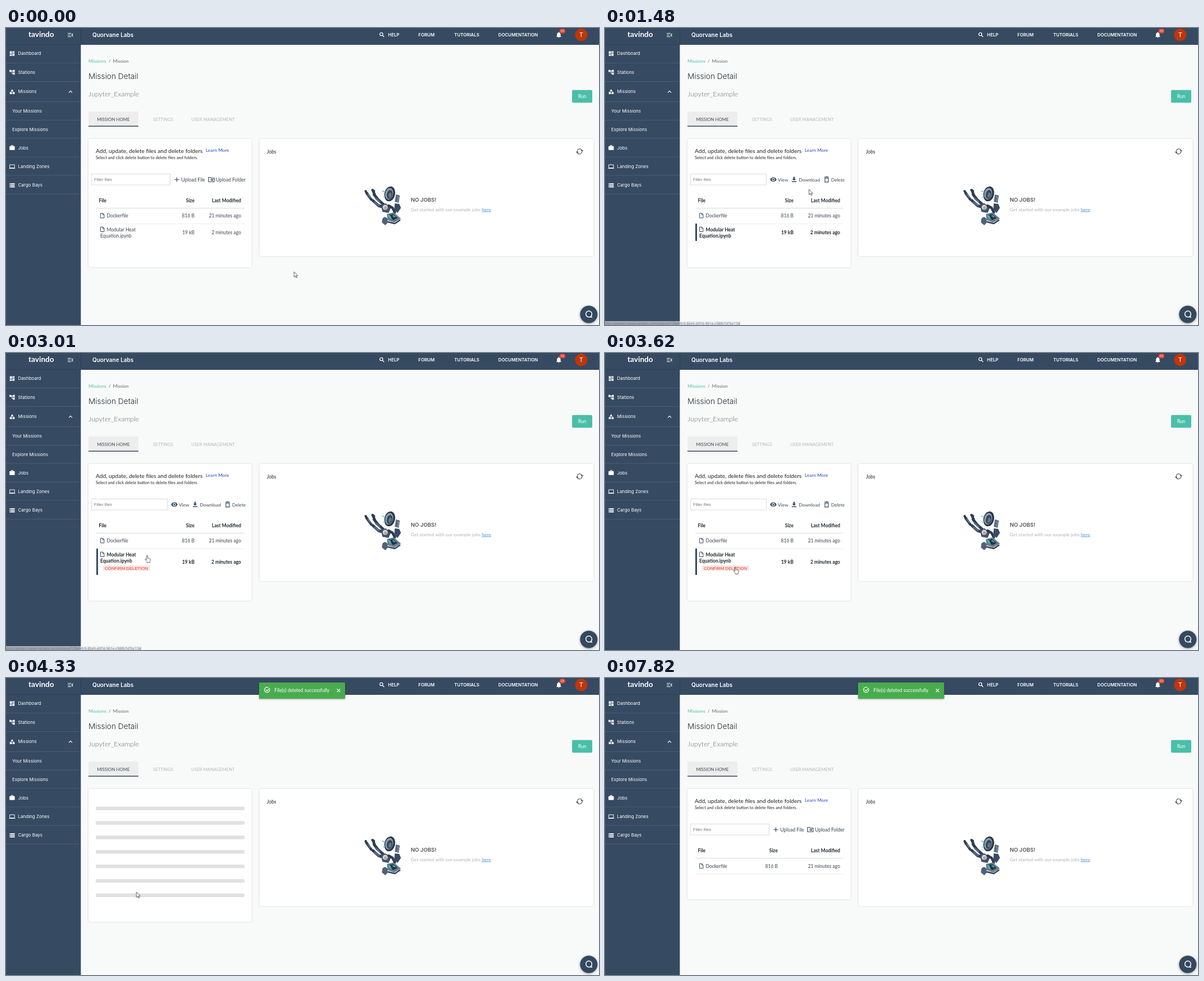
Animation, 1057 px wide and 530 px high, one loop 7900 ms. Source, as an HTML page:

```html
<!DOCTYPE html>
<html lang="en">
<head>
<meta charset="utf-8">
<title>Mission Detail</title>
<style>
html, body { margin: 0; width: 100%; height: 100%; overflow: hidden; background: #f8faf9; }
svg { display: block; }
text { font: 8.5px Lato, sans-serif; fill: #3b4452; white-space: pre; }
.nav text { font: 8px Inter, sans-serif; fill: #fff; }
.top text { font: 600 7.9px Inter, sans-serif; fill: #fff; }
.top .brand { font: 700 13.6px Lato, sans-serif; }
.top .org { font-size: 10px; }
.top .badge { font: 5px Inter, sans-serif; }
.top .initial { font: 11px Roboto, sans-serif; }
.title { font: 300 13.7px Inter, sans-serif; fill: #23282f; }
.name { font-weight: 300; font-size: 12.4px; fill: #666; }
.crumb { font-size: 8.3px; fill: #666; }
.tab { font-size: 7.8px; fill: #b4b7ba; }
.lead { font-size: 10.2px; fill: #222; }
.small { font-size: 7.45px; fill: #222; }
.action { font-size: 8.3px; }
.bold, .bold text { font-weight: 700; fill: #20262e; }
.arial { font: 7.5px "Liberation Sans", Arial, sans-serif; fill: #777; }
.url { font: 6.4px "Open Sans", sans-serif; fill: #6d757d; }
.end { text-anchor: end; }
.mid { text-anchor: middle; }
.line { fill: none; stroke: #34495e; stroke-width: 1.2; }
.card { fill: #fff; filter: drop-shadow(0 .6px 1px #0003); }

.panel, .idle, .picked, .plain, .confirm, .bar, .late, .skeleton, .status, .size,
.first, .card.files, .filter, .toast, .corner {
  animation: 7900ms step-end infinite;
}
.panel { animation-name: panel; }
.idle { animation-name: idle; }
.picked { animation-name: picked; }
.plain { animation-name: plain; }
.confirm { animation-name: confirm; }
.bar { height: 31px; animation-name: bar; }
.late { animation-name: late; }
.skeleton { animation-name: skeleton; }
.status { animation-name: status; }
.size { animation-name: size; }
.first { animation-name: first; }
.card.files { height: 229px; animation-name: grow; }
.filter { width: 140px; animation-name: filter; }
.toast { animation-name: toast; }
.corner { animation-name: corner; }
@keyframes panel { 0%, 83.165% { visibility: visible } 47.975% { visibility: hidden } }
@keyframes idle { 0%, 83.165% { visibility: visible } 10% { visibility: hidden } }
@keyframes picked { 0%, 47.975% { visibility: hidden } 10% { visibility: visible } }
@keyframes plain { 0% { visibility: visible } 10%, 100% { visibility: hidden } }
@keyframes confirm { 0%, 47.975% { visibility: hidden } 25.443% { visibility: visible } }
@keyframes bar { 25.443%, 100% { height: 47px } }
@keyframes late { 25.443%, 100% { transform: translateY(8px) } }
@keyframes skeleton { 0%, 83.165% { visibility: hidden } 47.975% { visibility: visible } }
@keyframes status {
  0%, 26.456%, 42.911% { visibility: hidden }
  6.1%, 35.1% { visibility: visible }
}
@keyframes size { 83.165%, 100% { transform: translateX(-28px) } }
@keyframes first { 83.165%, 100% { transform: translateY(.7px) } }
@keyframes grow {
  25.443% { height: 244px }
  47.975% { height: 237px }
  83.165%, 100% { height: 197px }
}
@keyframes filter { 10% { width: 135px } 83.165% { width: 140px } }
@keyframes toast {
  0% { opacity: 0 } 52.911% { opacity: .3 } 53.861% { opacity: .7 } 54.81%, 100% { opacity: 1 }
}
@keyframes corner {
  0%, 98.987% { opacity: 0 } 74.43% { opacity: .35 } 75.38% { opacity: .7 } 76.329% { opacity: 1 }
}
</style>
</head>
<body>
<svg width="1057" height="530" viewBox="0 0 1057 530">
  <defs>
    <path id="page" d="M.6.6h4l2.300 2.300v6.100h-6.300zM4.400.8v2.300h2.300" fill="none" stroke="#34495e"/>
    <path id="work" d="M20 6h-4V4a2 2 0 0 0-2-2h-4a2 2 0 0 0-2 2v2H4a2 2 0 0 0-2 2v11a2 2 0 0 0 2 2h16a2 2 0 0 0 2-2V8a2 2 0 0 0-2-2zm-6 0h-4V4h4z"/>
    <path id="bell" d="M12 22a2 2 0 0 0 2-2h-4a2 2 0 0 0 2 2zm6-6v-5c0-3-1.600-5.600-4.500-6.300V4a1.500 1.500 0 0 0-3 0v.7C7.600 5.400 6 8 6 11v5l-2 2v1h16v-1z"/>
    <path id="eye" fill-rule="evenodd" d="M12 4.500C7 4.500 2.700 7.600 1 12c1.700 4.400 6 7.500 11 7.500s9.300-3.100 11-7.500c-1.700-4.400-6-7.500-11-7.500zM12 17a5 5 0 1 1 0-10 5 5 0 0 1 0 10zm0-8a3 3 0 1 0 0 6 3 3 0 0 0 0-6z"/>
  </defs>

  <rect width="1057" height="530" fill="#f8faf9"/>

  <!-- mission heading -->
  <text class="crumb" x="147" y="62" style="fill:#4dbda5">Missions</text>
  <text class="crumb" x="183" y="62">/</text>
  <text class="crumb" x="190.500" y="62">Mission</text>
  <text class="title" x="147" y="91">Mission Detail</text>
  <text class="name" x="147" y="122">Jupyter_Example</text>
  <rect x="1009" y="110.700" width="36" height="22.600" rx="2" fill="#4abfa8" style="filter:drop-shadow(0 .4px .6px #0003)"/>
  <text class="mid" x="1027" y="125" style="fill:#fff">Run</text>
  <path d="M147 149h89v27h-89z" fill="#ededed"/>
  <path d="M147 174.600h89v1.400h-89z" fill="#34495e"/>
  <text class="tab mid" x="191.300" y="165.500" style="fill:#3c4a5b">MISSION HOME</text>
  <text class="tab mid" x="280" y="165.500">SETTINGS</text>
  <text class="tab mid" x="369" y="165.500">USER MANAGEMENT</text>

  <!-- jobs card -->
  <rect class="card" x="451.500" y="198" width="596" height="209" rx="3"/>
  <text x="465" y="223.500" style="fill:#222">Jobs</text>
  <g fill="none" stroke="#444" stroke-width="1.100">
    <path d="M1018.300 219.500a4.400 4.400 0 0 1 8.600-.5M1026.700 221a4.400 4.400 0 0 1-8.600.5"/>
    <path d="M1025 218.200l2 2 1.600-2.200M1020 222.300l-2-2-1.600 2.200"/>
  </g>
  <g stroke-linecap="round" stroke-linejoin="round">
    <g fill="none" stroke="#2d3c52">
      <path stroke-width="5" d="M654 308l10 9 10 3M656 297l7 9 10 9"/>
      <path stroke-width="4.500" d="M643 295l8 11M654 290l3 7"/>
      <path stroke-width="3" stroke="#5b6c80" d="M644 294l5 8M659 304l7 6M657 311l8 6"/>
      <path stroke-width="4" d="M641 291l2 4M653 289l3 2"/>
    </g>
    <g transform="rotate(12 684 296)">
      <ellipse cx="684" cy="296" rx="9.500" ry="13.500" fill="#27364b"/>
      <ellipse cx="683" cy="296" rx="7" ry="10.500" fill="#8f9caa"/>
      <ellipse cx="684" cy="297" rx="5" ry="8" fill="#34455c"/>
      <ellipse cx="685" cy="298" rx="2.500" ry="4.500" fill="#66788c"/>
    </g>
    <path d="M674 292l-3-1M676 300l-3 2" stroke="#4fc3c0" stroke-width="1.500"/>
    <path d="M668 315l9-2 9 8-4 9-11-2z" fill="#405570"/>
    <circle cx="676" cy="320" r="4.500" fill="#d6dbe0"/>
    <circle cx="676.500" cy="321" r="2.700" fill="#c79c83"/>
    <path d="M682 317l7 4 4 8" fill="none" stroke="#2d3c52" stroke-width="4.500"/>
    <path d="M695 297l7 2-2 13-7-2z" fill="#59697d"/>
    <path d="M693 313l8 1 3 7-6 9-6-5z" fill="#394c65"/>
    <path d="M697 301l3 1-2 8" fill="none" stroke="#a2acb7"/>
    <path d="M679 332l12-3 13 11-12 7-12-4z" fill="#6d7c8d"/>
    <path d="M681 334l9-2 8 7-8 4z" fill="#253449"/>
    <path d="M682 335l3 1M684 338l2 1M690 335l3 2" stroke="#36d0c0" stroke-width="2"/>
    <path d="M671 340q5-6 9 1v7l-4 4-6-5z" fill="#506178"/>
    <path d="M681 346l12 3 9-6" fill="none" stroke="#31435a" stroke-width="2.500"/>
  </g>
  <text x="721.500" y="310" style="font:600 9.600px Inter,sans-serif;fill:#555">NO JOBS!</text>
  <text x="721.500" y="326.500" style="font-size:8.4px;fill:#adb0b3">Get started with our example jobs <tspan fill="#4a95dd" text-decoration="underline">here</tspan>.</text>

  <!-- files card -->
  <rect class="card files" x="147" y="198" width="291" rx="3"/>
  <g class="panel">
    <text class="lead" x="160" y="222.500">Add, update, delete files and delete folders</text>
    <text class="action" x="356" y="220.700" style="fill:#2446c8">Learn More</text>
    <text class="small" x="160" y="233.500">Select and click delete button to delete files and folders.</text>
    <rect class="filter" x="152.500" y="260.500" height="19.500" fill="#fff" stroke="#d9dbdd"/>
    <text class="arial" x="157" y="272.500">Filter files</text>
    <g class="bold">
      <text x="165.500" y="310.500">File</text>
      <text class="end size" x="336" y="310.500">Size</text>
      <text class="end" x="419" y="310.500">Last Modified</text>
    </g>
    <path d="M161 321.500h264" stroke="#d8dadc"/>
    <path d="M161 349.500h264" stroke="#eee"/>
    <g class="first">
      <use href="#page" x="168" y="330"/>
      <text x="179.500" y="338.300">Dockerfile</text>
      <text class="end size" x="336" y="338.300">816 B</text>
      <text class="end" x="419" y="338.300">21 minutes ago</text>
    </g>
  </g>
  <g class="idle">
    <path class="line" d="M300.500 270.500h8M304.500 266.500v8"/>
    <text x="312.500" y="273.500">Upload File</text>
    <path class="line" d="M361 274.500v-8h3.500l1 1.300h5.500v6.700zM364 271.200h4.500M366.800 269.300l1.800 1.900-1.800 1.900"/>
    <text x="374.300" y="273.500">Upload Folder</text>
  </g>
  <g class="plain">
    <use href="#page" x="168" y="354.500"/>
    <text x="179.500" y="362.500">Modular Heat</text>
    <text x="168" y="373.700">Equation.ipynb</text>
    <text class="end" x="336" y="368.300">19 kB</text>
    <text class="end" x="419" y="368.300">2 minutes ago</text>
  </g>
  <g class="picked">
    <g fill="#34495e">
      <use href="#eye" transform="translate(293.800 264.200) scale(.52)"/>
      <path d="M335.800 265.500h2.400v3.500h2.200l-3.400 3.500-3.400-3.500h2.200zM333 273.500h8.300v1.400H333z"/>
    </g>
    <path class="line" d="M392 267.800h6v7h-6zM390.800 266h8.400M393.500 265.300h3"/>
    <text class="action" x="308" y="273.500">View</text>
    <text class="action" x="345.600" y="273.500">Download</text>
    <text class="action" x="403" y="273.500">Delete</text>
    <rect class="bar" x="161" y="349" width="3" fill="#34495e"/>
    <use href="#page" x="168" y="354.500"/>
    <g class="bold">
      <text x="179.500" y="362.500">Modular Heat</text>
      <text x="168" y="373.700">Equation.ipynb</text>
      <g class="late">
        <text class="end" x="336" y="368.300">19 kB</text>
        <text class="end" x="419" y="368.300">2 minutes ago</text>
      </g>
    </g>
  </g>
  <g class="confirm">
    <rect x="173" y="379" width="84" height="9.500" rx="1" fill="#f8e6e4"/>
    <text class="arial" x="176" y="386.500" style="font-size:7.75px;fill:#e8392b">CONFIRM DELETION</text>
  </g>
  <g class="skeleton" fill="#e1e1e1" id="bones"></g>

  <!-- top bar and sidebar -->
  <path d="M0 0h1057v30H0zM0 0h133.400v530H0z" fill="#364a62"/>
  <path d="M0 29.500h1057M133.500 0v30" stroke="#2b3d53" opacity=".7"/>
  <path d="M0 62.500h133m-133 33h133m-133 36h133m-133 33h133m-133 32.500h133m-133 33h133m-133 33h133m-133 33.500h133" stroke="#4a5d74"/>
  <g class="top">
    <text class="brand" x="40" y="16">tavindo</text>
    <path d="M110 9.500h6.500M110 12.500h5M110 15.500h6.500M119.500 10l-2.400 2.500 2.400 2.500" fill="none" stroke="#fff" stroke-width="1.100"/>
    <text class="org" x="154" y="16.200">Quorvane Labs</text>
    <g fill="none" stroke="#fff" stroke-width="1.200"><circle cx="669" cy="11" r="2.700"/><path d="M671 13l3 3"/></g>
    <text x="681" y="15">HELP</text>
    <text x="735" y="15">FORUM</text>
    <text x="799" y="15">TUTORIALS</text>
    <text x="877.500" y="15">DOCUMENTATION</text>
    <use href="#bell" transform="translate(978.800 5.800) scale(.54)" fill="#fff"/>
    <rect x="986.500" y="1.500" width="10.500" height="8" rx="4" fill="#e8442e"/>
    <text class="badge mid" x="991.700" y="7.400">20</text>
    <circle cx="1025.300" cy="12.300" r="11" fill="#bf360c"/>
    <text class="initial mid" x="1025.300" y="16.300">T</text>
  </g>
  <g class="nav">
    <g fill="#fff">
      <path transform="translate(5.300 40) scale(.47)" d="M3 13h8V3H3zm0 8h8v-6H3zm10 0h8V11h-8zm0-18v6h8V3z"/>
      <path transform="translate(5.300 73.300) scale(.47)" d="M22 11V3h-7v3H9V3H2v8h7V8h2v10h4v3h7v-8h-7v3h-2V8h2v3z"/>
      <path transform="translate(5.300 108) scale(.47)" d="M12 2l-5.500 9h11zM3 13.500h8v8H3zM17.500 13a4.500 4.500 0 1 0 .1 0z"/>
      <use href="#work" transform="translate(5.300 208) scale(.47)"/>
      <path transform="translate(5.300 241.700) scale(.47)" fill-rule="evenodd" d="M20 18a2 2 0 0 0 2-2V6a2 2 0 0 0-2-2H4a2 2 0 0 0-2 2v10a2 2 0 0 0 2 2H0v2h24v-2zM4 6h16v10H4z"/>
      <path transform="translate(5.300 275) scale(.47)" fill-rule="evenodd" d="M2 20h20v-4H2zm2-3h2v2H4zM2 4v4h20V4zm4 3H4V5h2zm-4 7h20v-4H2zm2-3h2v2H4z"/>
    </g>
    <path d="M112 115.300l3-3 3 3" fill="none" stroke="#fff" stroke-width="1.200"/>
    <text x="21.500" y="48.400">Dashboard</text>
    <text x="21.500" y="81.600">Stations</text>
    <text x="21.500" y="116.200">Missions</text>
    <text x="11" y="150.500">Your Missions</text>
    <text x="11" y="183.500">Explore Missions</text>
    <text x="21.500" y="216.700">Jobs</text>
    <text x="21.500" y="250.200">Landing Zones</text>
    <text x="21.500" y="283.200">Cargo Bays</text>
  </g>

  <g class="status">
    <rect x="133" y="523" width="109" height="7" fill="#eceeef"/>
    <rect y="523" width="133" height="7" fill="#a3abb4"/>
    <text class="url" x="0" y="529.500">ttps://galileo.hypernetlabs.io/missions/129e9fc9-80e9-497d-961e-c98fb747bc13#</text>
  </g>

  <g class="toast">
    <rect x="451" y="8" width="153.500" height="29" rx="1.500" fill="#48ac4e" style="filter:drop-shadow(0 1px 1.500px #0005)"/>
    <g fill="none" stroke="#fff" stroke-width="1.200">
      <path d="M470 20a4.700 4.700 0 1 1-2.500-3.200M463.200 21l2 2 5-5.200"/>
      <path d="M590 19.500l5.500 5.500m0-5.500l-5.500 5.500"/>
    </g>
    <text x="478.500" y="25.300" style="fill:#fff">File(s) deleted successfully</text>
  </g>

  <g id="arrow">
    <path d="M0 0v9.500l2.300-2 1.500 3.300 1.500-.7-1.500-3.100h3z" fill="#fff" stroke="#333" stroke-width=".8"/>
  </g>
  <g id="hand">
    <path d="M-1 1q1-1.500 2 0v4l4 1q1 .4 1 2l-1 3v2H0v-1.500l-3.500-4q0-1.500 1.300-1L-1 8z" fill="#fff" stroke="#333" stroke-width=".8"/>
  </g>

  <circle cx="1038.800" cy="511" r="15.500" fill="#34495e" style="filter:drop-shadow(0 1px 2px #0006)"/>
  <path d="M1042.500 514.500a5.400 5.400 0 1 0-2 1.100l4 .4z" fill="none" stroke="#fff" stroke-width="1.500" stroke-linejoin="round"/>
  <rect class="corner" x="1040" y="524" width="17" height="5" fill="#fff"/>
</svg>
<script>
const LOOP = 7900;
const $ = id => document.getElementById(id);

$('bones').innerHTML = Array.from({ length: 7 }, (_, i) =>
  `<rect x="160" y="${229.5 + i * 25.85}" width="265" height="6.500" rx="1.500"/>`).join('');

// Each move: first and last change, step count, start, bend, stop, ease-out power.
const moves = [
  [80, 711, 9, [513.5, 435], [352, 400], [192, 364], 1.6],
  [1100, 1850, 11, [192, 364], [295, 317], [403, 271], 2.15],
  [2620, 3390, 11, [403, 271], [317, 293], [231, 381], 2.7],
  [4650, 5343, 10, [232.5, 382], [560, 302], [978, 498], 1]
];

const path = [[0, 513.5, 435]];
for (const [from, to, n, a, b, c, power] of moves) {
  for (let k = 0; k < n; k++) {
    const p = 1 - (1 - (k + 1) / n) ** power, q = 1 - p;
    const at = i => q * q * a[i] + 2 * p * q * b[i] + p * p * c[i];
    path.push([from + k * (to - from) / (n - 1), at(0), at(1)]);
  }
}
path.push([3470, 232.5, 381.5], [3790, 232.5, 382], [5420, 978, 498, true], [LOOP, 978, 498, true]);
path.sort((a, b) => a[0] - b[0]);

// The pointer turns into a hand over the file row and the toolbar.
const isHand = (t, x, y) => t < 3790 && x < 425 && (y < 279 || (y > 349 && y < 390));

const run = (id, hand) => $(id).animate(path.map(([t, x, y, gone]) => ({
  offset: t / LOOP,
  transform: `translate(${x}px, ${y}px)`,
  opacity: !gone && isHand(t, x, y) === hand ? 1 : 0,
  easing: 'step-end'
})), { duration: LOOP, iterations: Infinity });
run('arrow', false);
run('hand', true);
</script>
</body>
</html>
```
